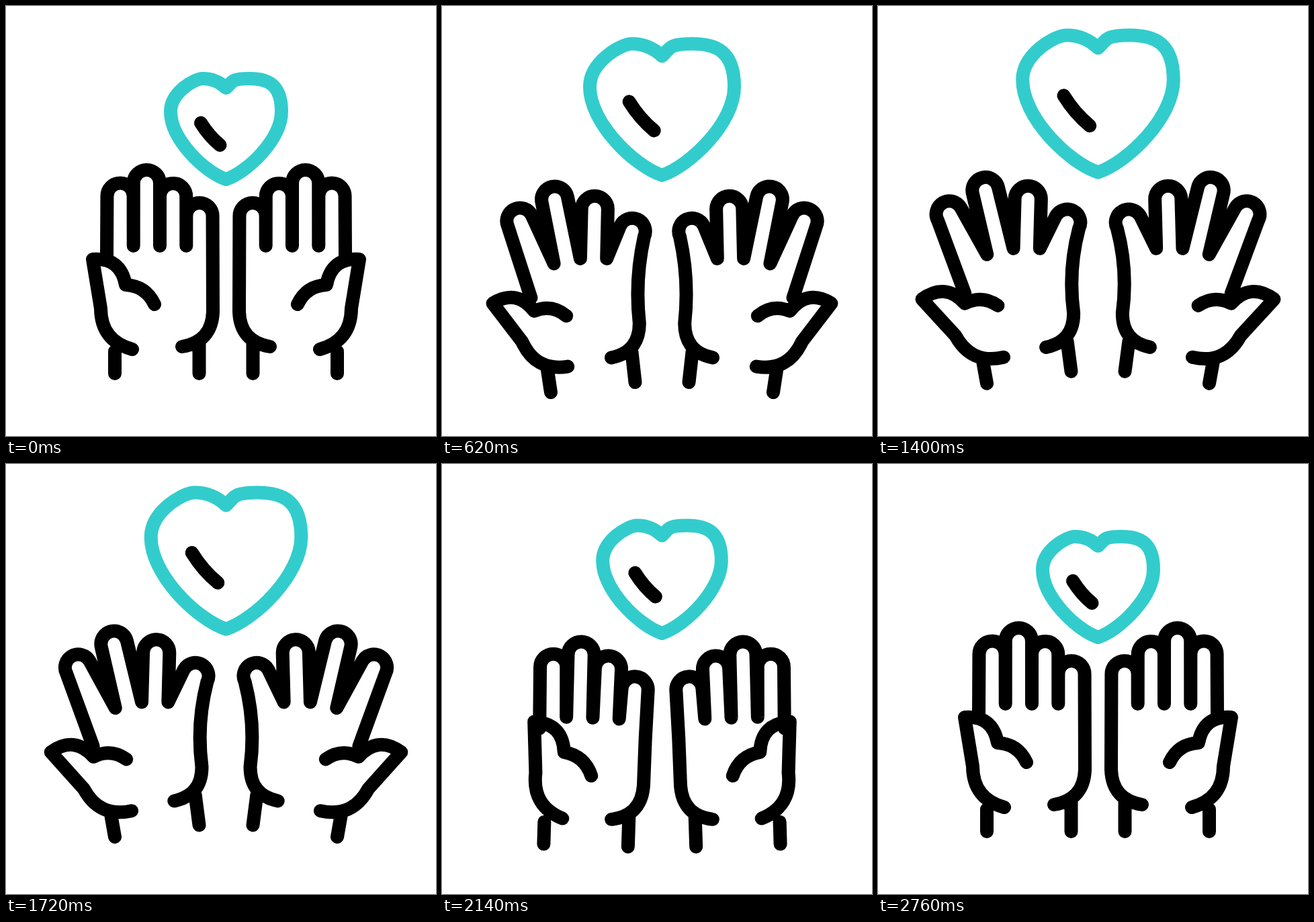
An HTML page for the animation above (3000 ms loop, 640 by 640 pixels).

```html
<!DOCTYPE html>
<html lang="en">
<head>
<meta charset="utf-8">
<title>Giving hands</title>
<style>
  html, body { margin: 0; width: 100%; height: 100%; overflow: hidden; background: #fff; }
  svg { display: block; width: 100vw; height: 100vh; }
  path { fill: none; stroke: #000; stroke-width: 20; stroke-linecap: round; stroke-linejoin: round; }
  .rim { stroke: #3cc; }
</style>
</head>
<body>
<svg viewBox="0 0 640 640">
  <g id="heart">
    <path class="rim" d="M0-136C-9.5-145-21.5-150-34.5-150S-82.5-129-82.5-101C-82.5-60-32.5-11 0 0C32.5-11 82.5-60 82.5-101S61.5-150 34.5-150S9.5-145 0-136Z"/>
    <path d="M-37.5-84Q-25.5-64.5-9-51"/>
  </g>
  <path class="hand"/>
  <path class="hand"/>
</svg>
<script>
const LOOP = 3000, R = 19.6, GAP = 39.3;
const lengths = [74, 93.5, 73.5, 44.5];   // little finger to index
const fan = [-29.7, -13.7, 1.6, 29];      // degrees when spread

// Keys: time, value, 1 = smooth arrival (otherwise linear)
const rise = [[120, 0], [600, .83, 1], [1640, 1.04]];
const tracks = {
  spread: [...rise, [2140, .08, 1], [2360, .61, 1], [2760, 0, 1]],
  size: [...rise, [2120, .2, 1], [2760, 0]],
  tip: [[120, 258], [600, 252, 1], [1720, 245.8], [2140, 252, 1], [2760, 258]],
  drop: [[120, 0], [360, 22, 1], [600, 16], [1720, -6.5], [2140, 18, 1], [2760, 0, 1]],
  tuck: [[1720, 0], [2140, 1, 1], [2360, 0, 1]]
};

function at(keys, t) {
  const i = keys.findIndex(key => t <= key[0]);
  if (i === 0) return keys[0][1];
  if (i < 0) return keys[keys.length - 1][1];
  const [t0, v0] = keys[i - 1], [t1, v1, smooth] = keys[i];
  let u = (t - t0) / (t1 - t0);
  if (smooth) u = u * u * (3 - 2 * u);
  return v0 + (v1 - v0) * u;
}

const str = p => p.map(n => n.toFixed(2)).join(' ');
const line = (a, b) => `M${str(a)}L${str(b)}`;

// Curve from a to b, bulging sideways by a share of the chord
function bow(a, b, h) {
  const dx = b[0] - a[0], dy = b[1] - a[1];
  const mid = [a[0] + dx / 2 + dy * h, a[1] + dy / 2 - dx * h];
  return `Q${str(mid)} ${str(b)}`;
}

// Left hand; spread is 0 closed to 1 open, the thumb has its own amount
function handPath(spread, thumb) {
  const joint = (k, x, y, dx, dy) => [x + k * dx, y + k * dy];
  const knuckle = i => joint(spread, 150.4 + GAP * i, 357, -27.7, Math.max(4, 22 - 9 * i));

  let side, d = 'M' + str(joint(spread, 150, 372, -21, 56));
  lengths.forEach((len, i) => {
    const a = fan[i] * spread * Math.PI / 180, sin = Math.sin(a), cos = Math.cos(a);
    const [x, y] = knuckle(i + .5);
    const cx = x + len * sin, cy = y - len * cos;
    side = [cx + R * cos, cy + R * sin];
    if (i) d += 'L' + str(knuckle(i));
    d += `L${str([cx - R * cos, cy - R * sin])}A${R} ${R} 0 0 1 ${str(side)}`;
  });

  const heel = joint(spread, 308, 455, -17, 2);
  d += bow(side, heel, -.1 * spread) + bow(heel, joint(spread, 262, 507, -12, 1), .41);

  const palm = joint(thumb, 188, 511, -1, 12), base = joint(thumb, 141, 450, -26, 41);
  const nail = joint(thumb, 129, 377, -64, 60), web = joint(thumb, 178, 415, -49, 28);
  const crease = joint(thumb, 221, 444, -43, 2);
  d += 'M' + str(palm) + bow(palm, base, .38) + 'L' + str(nail);
  d += bow(nail, web, .45) + bow(web, crease, .3);

  const arm = (foot, len) => line(foot, joint(spread, foot[0], foot[1] - len, -6, 0));
  return d + arm(joint(spread, 162, 547, 0, 15), 33) + arm(joint(spread, 287.5, 547, 0, -3), 45);
}

const heart = document.getElementById('heart');
const hands = document.querySelectorAll('.hand');
const sides = ['', 'matrix(-1 0 0 1 655 0) '];

function draw(t) {
  const v = {};
  for (const name in tracks) v[name] = at(tracks[name], t);

  const s = 1 + .364 * v.size;
  heart.setAttribute('transform', `translate(327.5 ${v.tip}) scale(${s})`);
  for (const p of heart.children) p.style.strokeWidth = 20 / s;

  const d = handPath(v.spread, v.spread - .25 * v.tuck);
  hands.forEach((p, i) => {
    p.setAttribute('d', d);
    p.setAttribute('transform', `${sides[i]}translate(0 ${v.drop}) rotate(${2.5 * v.tuck} 170 305)`);
  });
}

const start = performance.now();
function tick() {
  draw((performance.now() - start) % LOOP);
  requestAnimationFrame(tick);
}
tick();
</script>
</body>
</html>
```
